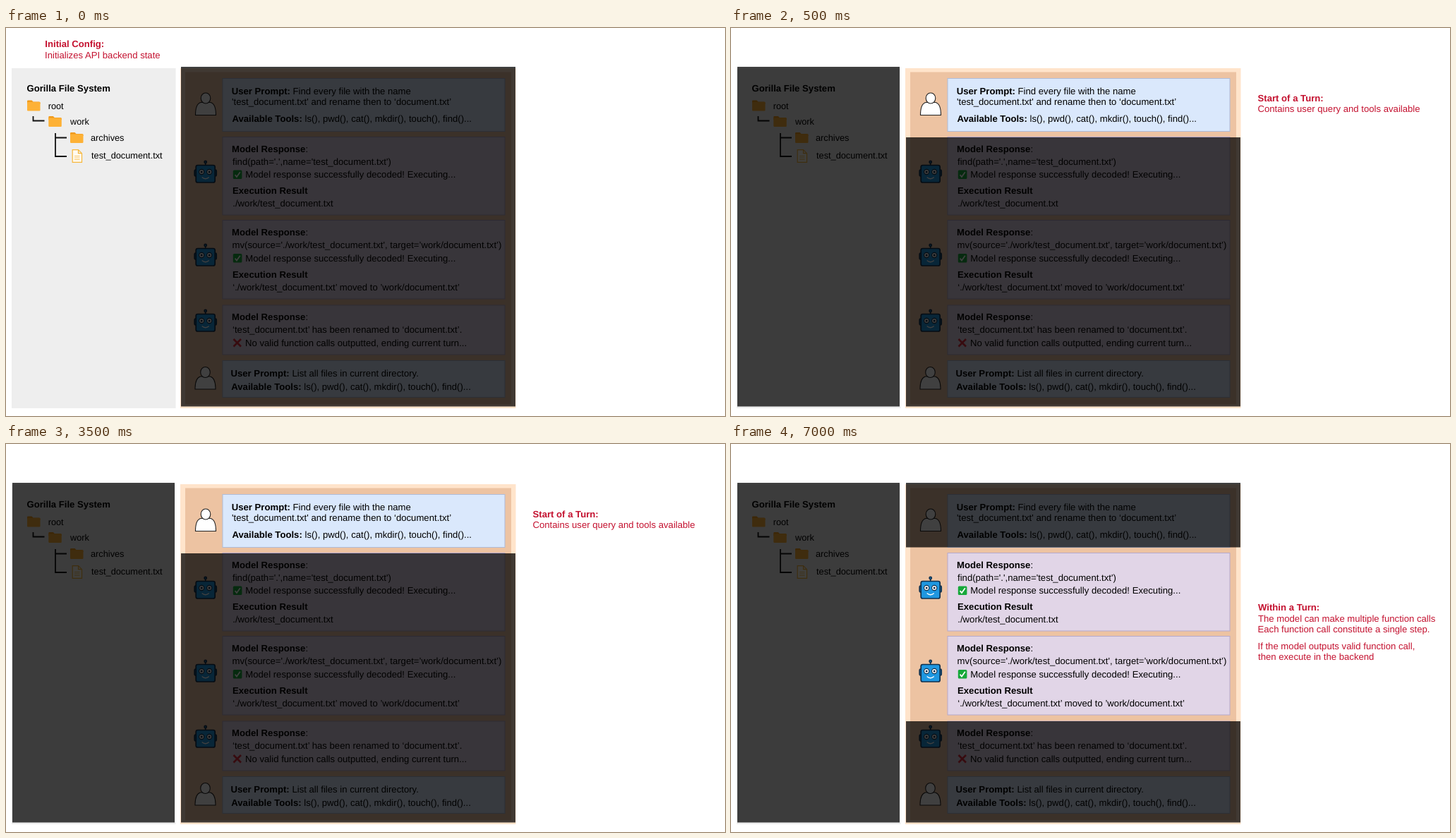
Recreate the animation shown at these times as an HTML page. Size 1019 px wide and 550 px high, loop 8 s.

```html
<!DOCTYPE html>
<html lang="en">
<head>
<meta charset="utf-8">
<title>Turn walkthrough</title>
<style>
html, body { margin: 0; width: 100%; height: 100%; overflow: hidden; background: #fff; }
svg { display: block; }
text { font: 13.15px "Liberation Sans", Arial, sans-serif; text-rendering: geometricPrecision; white-space: pre; }
.tree { font-size: 12.75px; }
.bold { font-weight: bold; }
.note { fill: #c41230; }
.blue { fill: #dae8fc; stroke: #aebbd8; }
.purple { fill: #e1d5e7; stroke: #b5a9cb; }
</style>
</head>
<body>
<svg id="stage" width="1019" height="550" viewBox="0 0 1019 550">
  <defs>
    <g id="folder">
      <path d="M0 1.2Q0 0 1.2 0H6.5L8.5 2H17Q18.5 2 18.5 3.5V5H0Z" fill="#f09a1c"/>
      <rect y="2.5" width="18.5" height="12.5" rx="1.2" fill="#fdb136"/>
    </g>
    <g id="file" stroke="#f6b73c">
      <path d="M.7 .7H9L14 5.7V18.3H.7ZM9 .7V5.7H14" fill="#fffaf0" stroke-width="1.2"/>
      <path d="M3.5 9.5H11M3.5 12H11M3.5 14.5H11" stroke-width=".7"/>
    </g>
    <g id="person" fill="#fff" stroke="#222" stroke-width="1.1">
      <path d="M-14.5 15.5Q-14.5 -.5 -7 -2.5H7Q14.5 -.5 14.5 15.5Z"/>
      <ellipse cy="-8.5" rx="6.8" ry="7.5"/>
    </g>
    <g id="robot" fill="#1f97e0" stroke="#12304d" stroke-width="1.7">
      <path d="M0 -9V-13"/>
      <circle cy="-14" r="1.6"/>
      <rect x="-15.5" y="-3" width="31" height="9" rx="1.5"/>
      <rect x="-13.5" y="-9.5" width="27" height="24.5" rx="2.5"/>
      <g fill="#fff" stroke-width="1.1"><circle cx="-5.5" r="3.6"/><circle cx="5.5" r="3.6"/></g>
      <g fill="#12304d" stroke="none"><circle cx="-5.5" r="1.5"/><circle cx="5.5" r="1.5"/></g>
      <path d="M-5 7.5Q0 12 5 7.5" fill="none" stroke="#fff" stroke-width="1.4"/>
    </g>
    <g id="tick">
      <rect width="12.6" height="12.6" rx="1.6" fill="#16a83a"/>
      <path d="M2.8 6.6L5.2 9.6L10 2.8" fill="none" stroke="#fff" stroke-width="1.7"/>
    </g>
    <path id="cross" d="M1 1L11.5 11.5M11.5 1L1 11.5" stroke="#dc2b3c" stroke-width="2.6"/>
  </defs>
</svg>
<script>
const LOOP = 8000;
const stage = document.getElementById("stage");

function add(tag, attrs, parent = stage) {
  const node = document.createElementNS("http://www.w3.org/2000/svg", tag);
  for (const key in attrs) node.setAttribute(key, attrs[key]);
  return parent.appendChild(node);
}
const rect = (x, y, width, height, attrs, parent) =>
  add("rect", { x, y, width, height, ...attrs }, parent);
const icon = (name, x, y) => add("use", { href: "#" + name, x, y });

function line(x, y, bold, plain = "", cls = "", parent = stage) {
  const text = add("text", { x, y, class: cls }, parent);
  if (bold) add("tspan", { class: "bold" }, text).textContent = bold;
  if (plain) add("tspan", {}, text).textContent = plain;
}

// Panels and message boxes
rect(8, 57, 232.5, 482, { fill: "#eee" });
rect(247, 57, 475.5, 482, { fill: "#ffe4cb" });
rect(254, 62.5, 462, 471, { fill: "#edc3a2" });
[[71.5, 75, "blue"], [154.5, 110.5, "purple"], [272.5, 111.5, "purple"],
 [393, 70, "purple"], [471.5, 52, "blue"]]
  .forEach(([y, h, cls]) => rect(307, y, 400, h, { class: cls }));

// Icons
icon("folder", 30, 102.5);
icon("folder", 60.3, 125);
icon("folder", 91, 148);
icon("file", 93.5, 172);
icon("person", 283, 108);
icon("person", 282.5, 496.5);
[204, 322, 415].forEach(y => icon("robot", 282.7, y));
icon("tick", 321.8, 201.5);
icon("tick", 321.8, 320);
icon("cross", 321.5, 440);

// File tree
add("path", { d: "M38.5 125V131.5H54.5M70 149V182H86M70 155.5H86",
  fill: "none", stroke: "#111", "stroke-width": 1.8 });
line(29.5, 90.3, "Gorilla File System");
line(59.7, 114.5, "", "root", "tree");
line(91, 136.5, "", "work", "tree");
line(120, 159.5, "", "archives", "tree");
line(121, 185, "", "test_document.txt", "tree");

// Conversation
const tools = " ls(), pwd(), cat(), mkdir(), touch(), find()...";
const decoded = "Model response successfully decoded! Executing...";
line(319.7, 93.5, "User Prompt:", " Find every file with the name");
line(320, 109, "", "'test_document.txt' and rename then to ‘document.txt’");
line(320.5, 133, "Available Tools:", tools);

line(320, 176, "Model Response", ":");
line(321, 194, "", "find(path='.',name='test_document.txt')");
line(339.3, 212, "", decoded);
line(321, 235, "Execution Result");
line(321.3, 253, "", "./work/test_document.txt");

line(320, 294, "Model Response", ":");
line(320.5, 312, "", "mv(source='./work/test_document.txt', target=’work/document.txt’)");
line(339.3, 331, "", decoded);
line(321, 354, "Execution Result");
line(321.3, 372, "", "‘./work/test_document.txt’ moved to ’work/document.txt’");

line(320, 414, "Model Response", ":");
line(321, 432, "", "‘test_document.txt’ has been renamed to ‘document.txt’.");
line(339, 450.5, "", "No valid function calls outputted, ending current turn...");

line(318.5, 494, "User Prompt:", " List all files in current directory.");
line(319.3, 513, "Available Tools:", tools);

// Each scene: start time, shaded areas as [x, y, w, h], note lines as [x, y, bold, plain]
const treeShade = [9, 55, 230, 481.5];
const chatShade = (top, bottom) => [248, top, 474, bottom - top];
const scenes = [
  { start: 0,
    shade: [chatShade(55, 536.5)],
    note: [[55.3, 27, "Initial Config:"], [55, 42.5, "", "Initializes API backend state"]] },
  { start: 500,
    shade: [treeShade, chatShade(155, 536.5)],
    note: [[746.5, 103.5, "Start of a Turn:"],
           [746.5, 119, "", "Contains user query and tools available"]] },
  { start: 5500,
    shade: [treeShade, chatShade(55, 146.5), chatShade(393, 536.5)],
    note: [[747, 235.5, "Within a Turn:"],
           [747, 251.5, "", "The model can make multiple function calls"],
           [746.5, 267, "", "Each function call constitute a single step."],
           [746.5, 290.5, "", "If the model outputs valid function call,"],
           [747, 306, "", "then execute in the backend"]] },
];
const shades = add("g", { fill: "#000", "fill-opacity": 0.75 });
const notes = add("g", { class: "note" });

function show({ shade, note }) {
  shades.replaceChildren();
  notes.replaceChildren();
  shade.forEach(area => rect(...area, {}, shades));
  note.forEach(([x, y, bold, plain]) => line(x, y, bold, plain, "", notes));
}

let current;
function tick() {
  const time = performance.now() % LOOP;
  const scene = scenes.findLast(s => time >= s.start);
  if (scene !== current) show(current = scene);
  requestAnimationFrame(tick);
}
tick();
</script>
</body>
</html>
```
